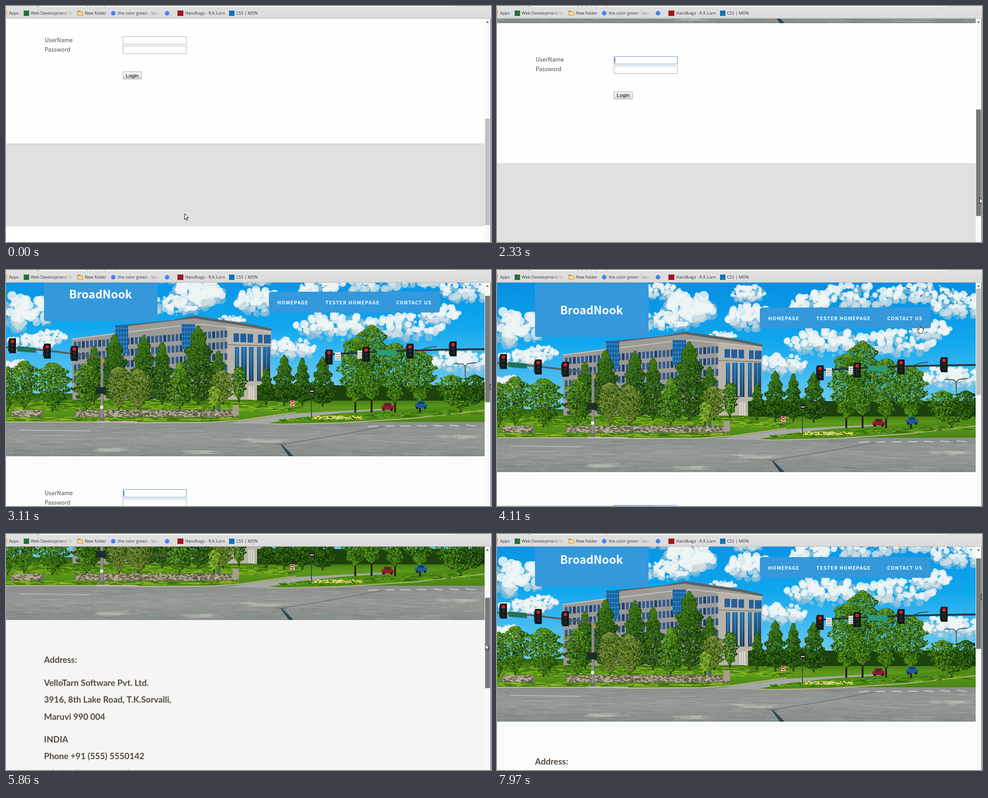
Animation of 1072x522 px, one loop 8000 ms. Source, as an HTML page with a canvas:

```html
<!DOCTYPE html>
<html lang="en">
<head>
<meta charset="utf-8">
<title>Site walkthrough</title>
<style>
html, body { margin: 0; width: 100%; height: 100%; overflow: hidden; background: #fff; }
canvas { display: block; }
</style>
</head>
<body>
<canvas id="stage" width="1072" height="522"></canvas>
<script>
const W = 1072, H = 522, VIEW = 1058, LOOP = 8000;
const SANS = '"Noto Sans CJK JP", "Noto Sans CJK SC", "Noto Sans CJK", "Noto Sans", sans-serif';
const g = document.getElementById('stage').getContext('2d');

let seed = 7;
const rnd = () => (seed = (seed * 16807) % 2147483647) / 2147483647;
const span = (a, b) => a + (b - a) * rnd();

function rect(c, x, y, w, h, fill) { c.fillStyle = fill; c.fillRect(x, y, w, h); }
function poly(c, fill, ...p) {
  c.beginPath();
  for (let i = 0; i < p.length; i += 2) c.lineTo(p[i], p[i + 1]);
  c.closePath();
  c.fillStyle = fill;
  c.fill();
}
function line(c, color, width, ...p) {
  c.beginPath();
  for (let i = 0; i < p.length; i += 2) c.lineTo(p[i], p[i + 1]);
  c.strokeStyle = color;
  c.lineWidth = width;
  c.stroke();
}
function dot(c, x, y, r, fill) {
  c.beginPath();
  c.arc(x, y, r, 0, 7);
  c.fillStyle = fill;
  c.fill();
}
function fade(c, x0, y0, x1, y1, ...stops) {
  const f = c.createLinearGradient(x0, y0, x1, y1);
  stops.forEach((s, i) => f.addColorStop(i / (stops.length - 1), s));
  return f;
}
function round(c, x, y, w, h, r, fill) {
  c.beginPath();
  c.roundRect(x, y, w, h, r);
  c.fillStyle = fill;
  c.fill();
}

// ---- header picture, painted once in page coordinates ----
function cloud(c, x, y, w, h) {
  for (let i = 0; i < 130; i++) {
    const a = span(0, 6.28), d = Math.sqrt(rnd());
    const dx = Math.cos(a) * d, dy = Math.sin(a) * d;
    const low = i < 55;
    dot(c, x + dx * w, y + dy * h * 0.8 + (low ? h * 0.25 : 0), h * span(0.08, 0.3),
      low ? 'rgba(160,196,214,.55)' : dy > 0.5 ? 'rgba(205,221,228,.75)' : 'rgba(238,244,245,.85)');
  }
}

const LEAF = ['#12300a', '#1f480d', '#2f6411', '#467f17', '#6a9f22'];
const DARK = ['#0e2709', '#17390b', '#234f0e', '#316413', '#477b1b'];
const DRY = ['#29400f', '#3d5a16', '#56721f', '#6d8430', '#869743'];

function tree(c, x, top, base, w, tones = LEAF, cone = 0) {
  const h = base - top, n = w * h / 5;
  line(c, '#30281a', 3, x, base - h * 0.3, x, base + 8);
  for (let i = 0; i < n; i++) {
    const u = rnd(), v = span(-1, 1);
    const shape = cone ? Math.pow(u, 0.65) * (1 - Math.pow(u, 14)) : Math.pow(Math.sin(Math.PI * Math.pow(u, 0.8)), 0.6);
    const ragged = 0.82 + 0.18 * Math.sin(u * 31 + x);
    const tone = Math.min(4, Math.floor(i / n * 4.2 + rnd() * 1.4 - u * 0.9 - v * 0.4));
    dot(c, x + v * shape * ragged * w / 2, top + u * h, span(0.8, 2.6 - i / n), tones[Math.max(0, tone)]);
  }
}

function building(c) {
  poly(c, '#9c9a95', 145, 187, 240, 174, 240, 160, 370, 146, 415, 139, 540, 157, 586, 168, 584, 322, 147, 322);
  poly(c, '#b9b4aa', 487, 160, 586, 170, 584, 322, 487, 322);
  poly(c, '#5d6265', 240, 158, 368, 146, 415, 136, 538, 154, 587, 165, 587, 170, 536, 160, 415, 142, 262, 160);
  line(c, '#c9c5bc', 2, 145, 188, 240, 176, 388, 158, 430, 155, 487, 161, 586, 171);
  for (let r = 0; r < 4; r++)
    for (let x = 150; x < 484; x += 9)
      rect(c, x, 194 - (x - 147) * 0.075 + r * 25, 6, 15, x % 4 ? '#2f5c8e' : '#1d3f68');
  for (const [x, y, w, h] of [[241, 157, 29, 62], [388, 155, 30, 55]]) {
    rect(c, x, y, w, h, '#1c6fae');
    for (let i = 4; i < w; i += 6) line(c, '#0d4273', 1, x + i, y, x + i, y + h);
    for (let i = 7; i < h; i += 10) line(c, '#5aa5d0', 1, x, y + i, x + w, y + i);
  }
  for (const [x, w] of [[503, 12], [518, 13], [534, 12], [557, 10], [570, 15]])
    rect(c, x, 175 + (x - 503) * 0.05, w, 19, '#235f9c');
  line(c, '#85827c', 2, 487, 200, 585, 203);
  for (const [x, w] of [[506, 9], [520, 12], [537, 10], [555, 8], [568, 16]]) {
    rect(c, x, 205, w, 76, fade(c, 0, 205, 0, 281, '#1d6fb0', '#16395c'));
    line(c, '#7fb4d4', 1, x + w / 2, 205, x + w / 2, 281);
  }
  for (let x = 536; x < 550; x += 5) rect(c, x, 292, 3, 30, '#dad8d2');
}

function signal(c, x, y) {
  rect(c, x - 7, y - 16, 15, 33, '#10181a');
  rect(c, x - 9, y - 12, 3, 25, '#20292a');
  dot(c, x, y - 9, 4, '#d91f26');
  dot(c, x, y, 3.5, '#33241f');
  dot(c, x, y + 9, 3.5, '#1e2c25');
}

function ground(c) {
  rect(c, 0, 308, VIEW, 70, fade(c, 0, 308, 0, 370, '#2e5d10', '#5f9a1a', '#4a8517'));
  for (let i = 0; i < 700; i++)
    rect(c, span(0, 640), span(318, 346), span(4, 20), 1.4, rnd() < 0.5 ? '#86b91f' : '#37690f');
}

function street(c) {
  rect(c, 0, 371, VIEW, 76, fade(c, 0, 371, 0, 447, '#8b908e', '#969a97', '#858b88'));
  poly(c, '#a5a8a5', 480, 374, 640, 352, 830, 342, 862, 344, 700, 357, 578, 376);
  poly(c, '#4d8a17', 578, 374, 650, 361, 745, 351, 940, 339, VIEW, 331, VIEW, 345, 900, 362, 740, 372, 600, 376);
  line(c, '#c6b88f', 2, 578, 375, 610, 376, 740, 373, 900, 363, VIEW, 345);
  for (let i = 0; i < 230; i++) {
    const x = span(600, 1040);
    rect(c, x, 367 - (x - 600) * 0.045 + span(-6, 6) * (x > 690 ? 1 : 0.4), span(3, 14), 1.3, rnd() < 0.5 ? '#78ad20' : '#2c5e10');
  }
  for (let i = 0; i < 160; i++)
    dot(c, span(672, 788), span(358, 365), 1.2, rnd() < 0.65 ? '#e3d73b' : '#eceadf');
  line(c, '#c9bd96', 2, 0, 371, 205, 371, 300, 373, 450, 372, 520, 367, 640, 350);
  rect(c, 200, 369, 90, 4, '#bfb8a0');
  for (let i = 0; i < 620; i++)
    rect(c, span(-40, VIEW), span(377, 446), span(8, 55), 1, rnd() < 0.5 ? 'rgba(188,191,186,.3)' : 'rgba(96,104,102,.25)');
  for (const [x, y] of [[240, 432], [440, 437], [570, 412], [1000, 404]])
    for (let i = 0; i < 20; i++) rect(c, x + span(-55, 15), y + span(-4, 4), span(15, 50), 1.5, 'rgba(190,193,185,.5)');
  line(c, '#dcdedb', 1, 30, 389, 185, 391);
  for (let x = 800; x < 1030; x += 36) line(c, '#dfe1de', 1.5, x, 381 - (x - 800) * 0.015, x + 22, 380);
  line(c, '#525d5f', 1, 607, 421, 700, 406, 840, 381);
  poly(c, '#2c4650', 606, 420, 613, 424, 636, 447, 625, 447);
  line(c, '#4d595b', 1, 596, 420, 620, 422);
}

function wall(c) {
  for (const [a, b] of [[12, 82], [153, 515]]) {
    rect(c, a, 344, b - a, 16, '#77715f');
    for (let i = 0; i < (b - a) * 1.6; i++)
      rect(c, span(a, b - 6), span(344, 358), span(3, 7), span(1.5, 3), rnd() < 0.6 ? '#b9b09a' : '#59533f');
  }
  rect(c, 501, 333, 14, 24, '#a59d88');
  for (let i = 0; i < 150; i++)
    rect(c, span(0, 500), span(360, 368), span(6, 25), 1.6, rnd() < 0.5 ? '#8dba25' : '#3a6c12');
}

function car(c, x, y, color) {
  round(c, x - 13, y - 2, 27, 9, 3, color);
  round(c, x - 8, y - 8, 17, 8, 3, color);
  rect(c, x - 5, y - 6, 11, 4, '#26323b');
  dot(c, x - 8, y + 7, 2.5, '#191919');
  dot(c, x + 9, y + 7, 2.5, '#191919');
}

function furniture(c) {
  line(c, '#57605f', 4, 0, 206, 80, 212, 213, 228);
  line(c, '#8d8f87', 6, 212, 222, 212, 368);
  line(c, '#555a57', 1, 215, 222, 215, 368);
  rect(c, 207, 362, 11, 7, '#6a6c66');
  rect(c, 208, 335, 7, 7, '#e4e4df');
  rect(c, 213, 233, 5, 7, '#c8912b');
  rect(c, 199, 294, 22, 15, '#1e2b2c');
  poly(c, '#23715a', 25, 203, 66, 207, 66, 218, 25, 215);
  signal(c, 14, 202);
  signal(c, 91, 214);
  signal(c, 151, 219);
  line(c, '#26363b', 4, VIEW, 210, 980, 211, 860, 214, 708, 222);
  rect(c, 820, 212, 43, 12, '#2a9a7d');
  for (const [x, y] of [[727, 217], [777, 213]]) {
    rect(c, x, y, 13, 18, '#e3e7e6');
    for (let i = 4; i < 17; i += 5) rect(c, x + 2, y + i, 9, 1.5, '#8d9494');
  }
  signal(c, 714, 227);
  signal(c, 796, 221);
  signal(c, 893, 214);
  signal(c, 988, 209);
  line(c, '#3e4f55', 2, 917, 212, 935, 206, 952, 204);
  line(c, '#4c5658', 2, 1015, 271, 1015, 248, 1010, 243, 990, 242);
  line(c, '#4c5658', 2, 1015, 248, 1021, 242, 1040, 240);
  line(c, '#3d433f', 2, 675, 300, 675, 365);
  rect(c, 670, 298, 12, 9, '#202a2b');
  rect(c, 672, 302, 8, 2, '#e6e6e6');
  line(c, '#6b6f69', 1, 633, 334, 633, 352);
  rect(c, 628, 324, 10, 11, '#e8e2df');
  dot(c, 633, 329, 4.5, '#d2242b');
  rect(c, 630, 328, 6, 2, '#fff');
  rect(c, 467, 334, 7, 13, '#4d646b');
  car(c, 843, 337, '#8f1b26');
  car(c, 917, 333, '#1a5c9c');
}

function paintPhoto() {
  const cv = document.createElement('canvas');
  cv.width = VIEW;
  cv.height = 447;
  const c = cv.getContext('2d');
  rect(c, 0, 0, VIEW, 447, fade(c, 0, 28, 0, 290, '#078fe2', '#10a7ee', '#6bcaf2'));
  for (const [x, y, w, h] of [
    [20, 125, 85, 42], [100, 182, 34, 17], [55, 194, 50, 22], [10, 248, 38, 20], [360, 45, 45, 20],
    [425, 82, 58, 38], [370, 112, 60, 24], [500, 145, 30, 12], [555, 102, 50, 30], [555, 50, 38, 20],
    [630, 206, 52, 24], [725, 155, 85, 33], [800, 55, 100, 32], [690, 80, 45, 30], [890, 158, 85, 30],
    [960, 130, 42, 24], [940, 50, 80, 24], [1015, 75, 60, 30], [1005, 235, 70, 28]
  ]) cloud(c, x, y, w, h);
  ground(c);
  building(c);
  rect(c, 555, 290, 503, 34, '#1c410d');
  for (const [x, top, base, w] of [[195, 205, 322, 75], [240, 178, 322, 100], [305, 180, 325, 90], [345, 195, 325, 75],
    [425, 160, 325, 125], [470, 215, 318, 65]]) tree(c, x, top, base, w, DARK, 1);
  for (const [x, top, base, w] of [[4, 250, 340, 36], [40, 237, 335, 75], [103, 241, 340, 92], [178, 243, 338, 68],
    [515, 250, 320, 40]]) tree(c, x, top, base, w);
  tree(c, 250, 250, 338, 60, DRY);
  tree(c, 292, 256, 338, 68, DRY);
  tree(c, 480, 258, 325, 62, DRY);
  tree(c, 384, 238, 335, 82, LEAF, 1);
  tree(c, 460, 293, 335, 30, ['#3d6b12', '#55861a', '#6d9c22', '#86b02c', '#9ec33a']);
  for (const [x, top, base, w] of [[575, 250, 325, 46], [615, 225, 328, 76], [655, 230, 328, 60], [700, 228, 330, 80]])
    tree(c, x, top, base, w, DARK, 1);
  tree(c, 985, 268, 330, 76);
  tree(c, 1035, 268, 332, 60, DARK);
  street(c);
  wall(c);
  for (const [x, top, base, w] of [[772, 187, 326, 88], [808, 158, 320, 90], [860, 197, 326, 78], [915, 214, 325, 82]]) {
    line(c, '#241d12', 4, x, 300, x, 350);
    tree(c, x, top, base, w);
  }
  tree(c, 1005, 326, 342, 45);
  furniture(c);
  return cv;
}
const photo = paintPhoto();

// ---- timeline ----
const STEPS = [[400, 540, 2], [810, 1100, 3], [1910, 1910, 1], [2180, 3110, 8], [3260, 3680, 4],
  [3960, 4890, 8], [5020, 6010, 8], [6280, 6950, 6], [7500, 7970, 4]];
const SCROLL = [[0, 453], [1910, 453], [2180, 436], [2313, 409], [3110, 35], [3260, 12], [3400, 0],
  [5303, 0], [5869, 257], [6010, 292], [6280, 345], [6950, 611], [7343, 611], [7500, 505], [7970, 32]];
const MOUSE = [[0, 394, 459], [400, 760, 456], [540, 1061, 456], [810, 1064, 452], [1100, 1066, 450], [1910, 1066, 446],
  [2180, 1066, 436], [2313, 1066, 424], [3110, 1070, 252], [3260, 1068, 241], [3400, 1066, 236], [3680, 1010, 190],
  [3960, 940, 130], [4226, 927, 112], [4890, 926, 112], [5020, 1000, 140], [5161, 1050, 143], [5303, 1059, 143],
  [5869, 1059, 243], [6010, 1060, 256], [6280, 1064, 262], [6950, 1070, 360], [7343, 1070, 360], [7500, 1070, 317], [7970, 1070, 133]];

function snap(t) {
  let q = 0;
  for (const [a, b, n] of STEPS)
    for (let i = 0; i < n; i++) {
      const u = a + (b - a) * i / Math.max(1, n - 1);
      if (u - 10 <= t) q = u;
    }
  return q;
}
function at(keys, t, k) {
  let i = 0;
  while (i < keys.length - 1 && keys[i + 1][0] <= t) i++;
  const a = keys[i], b = keys[i + 1] || a;
  return a === b ? a[k] : a[k] + (b[k] - a[k]) * (t - a[0]) / (b[0] - a[0]);
}

function text(str, x, y, font, fill, align = 'left', gap = 0) {
  g.font = font;
  g.fillStyle = fill;
  g.textAlign = align;
  g.letterSpacing = gap + 'px';
  g.fillText(str, x, y);
  g.letterSpacing = '0px';
}

function banner() {
  g.drawImage(photo, 0, 0);
  round(g, 84, 20, 251, 128, 4, '#3498db');
  text('BroadNook', 209, 98, 'bold 25px ' + SANS, '#fff', 'center');
  round(g, 581, 83, 378, 46, 5, '#3498db');
  const font = 'bold 10.7px ' + SANS;
  text('HOMEPAGE', 599.5, 111, font, '#fff', 'left', 1.2);
  text('TESTER HOMEPAGE', 706, 111, font, '#fff', 'left', 1.2);
  text('CONTACT US', 862.5, 111, font, '#fff', 'left', 1.2);
}

function footer(y) {
  rect(g, 0, y, VIEW, 183, '#e0e0e0');
  rect(g, 0, y, VIEW, 1, '#c6c6c6');
  rect(g, 0, y + 183, VIEW, 200, '#fff');
}

function field(y, focus) {
  rect(g, 258, y, 141, 18, focus ? '#5b94e4' : '#ababab');
  rect(g, 259, y + 1, 139, 16, '#fff');
  if (focus) rect(g, 260, y + 3, 1, 12, '#000');
}

function loginPage(s, focus) {
  rect(g, 0, 447, VIEW, 800, s < 380 ? '#fbfcfb' : '#fefefe');
  const font = '300 12.7px ' + SANS;
  text('UserName', 85.5, 532.5, font, '#4a4a4a');
  text('Password', 85.5, 553.5, font, '#4a4a4a');
  field(520, focus);
  field(541, false);
  round(g, 258, 598, 42, 17, 1, '#a3a3a3');
  rect(g, 259, 599, 40, 15, fade(g, 0, 599, 0, 614, '#f8f8f8', '#ebebeb', '#d6d6d6'));
  text('Login', 279, 610.5, '11.8px "Liberation Sans", Arial, sans-serif', '#000', 'center');
  footer(757.5);
}

const ADDRESS = [['Address:', 542], ['VelloTarn Software Pvt. Ltd.', 593], ['3916, 8th Lake Road, T.K.Sorvalli,', 630],
  ['Maruvi 990 004', 667.5], ['INDIA', 718], ['Phone +91 (555) 5550142', 755], ['info@vellotarn.example', 792],
  ['USA', 880], ['Phone: (555) 555-0142', 917.5]];

function contactPage(s) {
  const clear = s > 419;
  rect(g, 0, 447, VIEW, 900, clear ? '#fff' : s > 130 ? '#f5f5f5' : '#fafcfb');
  if (clear)
    for (const [y, h] of [[516, 38], [567, 112], [692, 112], [818, 121]]) rect(g, 84, y, 875, h, '#efefef');
  for (const [str, y] of ADDRESS)
    text(str, 84, y, 'bold 19px Lato, Carlito, sans-serif', str.includes('@') ? '#337ab7' : '#51493f');
  footer(939);
}

function scrollbar(s, second, state) {
  rect(g, VIEW, 28, 13, H - 28, '#f9f9f9');
  poly(g, '#505050', 1061, 37, 1067, 37, 1064, 33.5);
  rect(g, 1059, Math.round(41 + s * (second ? 0.391 : 0.46)), 11, second ? 200 : 235.5, ['#c1c1c1', '#a8a8a8', '#787878'][state]);
  rect(g, W - 1, 28, 1, H - 28, '#33363a');
}

function mark(str, x, end) {
  const fill = end ? fade(g, end - 28, 0, end, 0, '#333', 'rgba(51,51,51,.1)') : '#333';
  text(str, x, 19.3, '9.3px "Open Sans", "Noto Sans", sans-serif', fill);
}

function chrome(second) {
  rect(g, 0, 0, W, 28, fade(g, 0, 0, 0, 28, '#e2e2e2', '#dadada'));
  rect(g, 62, 0, 930, 3, '#fff');
  rect(g, 62, 3, 930, 1, '#bdbdbd');
  rect(g, 66, 0, 9, 1, '#8a8a8a');
  rect(g, 978, 0, 2, 1, '#888');
  rect(g, 984, 0, 2, 1, '#888');
  for (const x of second ? [239] : [178, 186, 197, 207, 217, 239]) rect(g, x, 0, 3, 1, '#888');
  rect(g, 0, 27, W, 1, '#b4b4b4');
  for (const [y, c] of [[11, '#e5533d'], [15, '#e8a33a'], [19, '#e8a33a']]) rect(g, 0, y, 2, 2, c);
  mark('Apps', 6.5);
  rect(g, 39, 10, 12, 12, '#22713a');
  mark('Web Development Te', 54.5, 148);
  round(g, 158, 10, 6, 4, 1, '#b98f35');
  round(g, 158, 12, 12, 9, 1, '#b98f35');
  rect(g, 159, 13, 10, 7, '#f6dc93');
  mark('New folder', 174);
  dot(g, 237, 16, 5, '#4285f4');
  mark('the color green - Sea', 247, 340);
  dot(g, 356, 16, 5, '#4285f4');
  rect(g, 379, 10, 13, 12, '#a3121f');
  mark('Handbags - R.K.Lorn', 396);
  rect(g, 493, 10, 12, 12, '#1272b6');
  mark('CSS | MDN', 508.5);
}

function outline(w, ...p) {
  poly(g, '#fff', ...p);
  line(g, '#000', w, ...p, p[0], p[1]);
}
function cursor(x, y, hand) {
  g.save();
  g.translate(x + 0.5, y + 0.5);
  g.lineJoin = 'round';
  if (hand)
    outline(1, -1, 1, 0, 0, 1.5, 1, 1.5, 6, 3.5, 5.5, 4.5, 7, 6, 6.5, 7, 8, 8, 8, 8, 13, 6, 17, 6, 19, -1, 19, -1, 17, -5, 11, -5, 9, -3, 9, -1, 11);
  else
    outline(1, 0, 0, 0, 12.5, 3, 9.8, 5, 14.8, 7, 14, 5, 9, 8.8, 9);
  g.restore();
}

function draw(t) {
  const q = snap(t), s = at(SCROLL, q, 1), x = at(MOUSE, q, 1), y = at(MOUSE, q, 2);
  const second = q > 4450;
  const pressed = (q >= 1910 && q < 3450) || q > 5300;
  const hand = x > 581 && x < 959 && y > 83 && y < 129;
  g.save();
  g.translate(0, -s);
  if (second) contactPage(s); else loginPage(s, q >= 1910);
  banner();
  g.restore();
  scrollbar(s, second, pressed ? 2 : x >= VIEW ? 1 : 0);
  chrome(second);
  if (hand) rect(g, 0, H - 1, 345, 1, '#c4c4c4');
  cursor(x, y, hand);
}

function tick() {
  draw(performance.now() % LOOP);
  requestAnimationFrame(tick);
}
tick();
</script>
</body>
</html>
```
